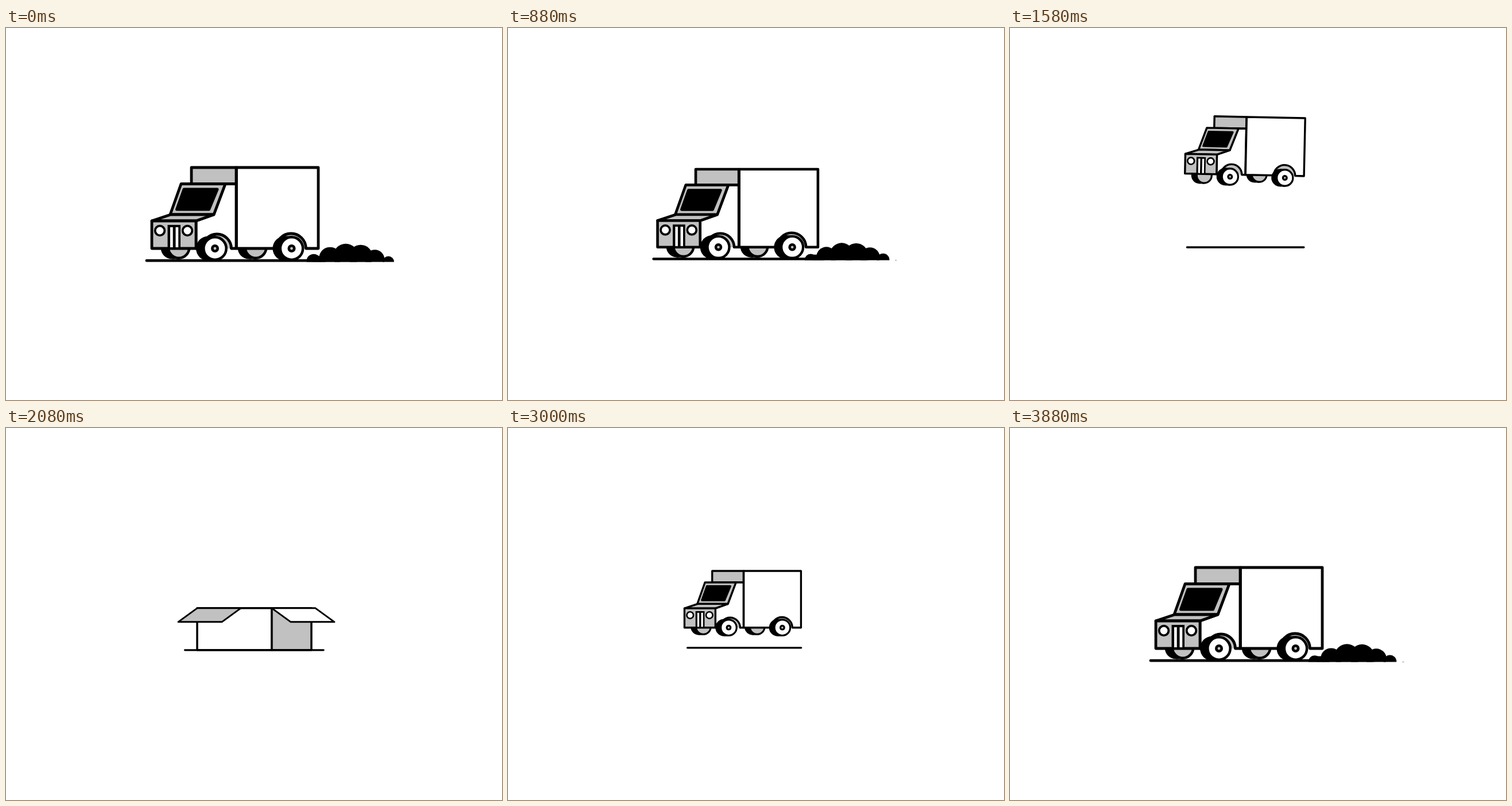
These frames come from a looping animation (864 px wide and 648 px high, 3930 ms). An HTML page with a canvas:

```html
<!DOCTYPE html>
<html lang="en">
<head>
<meta charset="utf-8">
<title>Delivery truck</title>
<style>
  html, body { margin: 0; width: 100%; height: 100%; overflow: hidden; background: #fff; }
  canvas { display: block; }
</style>
</head>
<body>
<canvas id="stage" width="864" height="648"></canvas>
<script>
const ctx = document.getElementById('stage').getContext('2d');
const LOOP = 3930, FRAMES = 94, TICK = 1000 / 24;
const CX = 432, CY = 324, FLOOR = 384, ROAD = 405.2, LINE = 4.8;
const BLACK = '#000', GRAY = '#c1c1c1', WHITE = '#fff';

// Timing helpers; a and b are the first and last tick of a move.
const ramp = (f, a, b) => Math.min(1, Math.max(0, (f - a) / (b - a)));
const easeIn = (f, a, b) => ramp(f, a, b) ** 2;
const easeOut = (f, a, b) => 1 - (1 - ramp(f, a, b)) ** 2;
const smooth = (f, a, b) => ramp(f, a, b) ** 2 * (3 - 2 * ramp(f, a, b));
const bump = (f, a, b) => Math.sin(Math.PI * ramp(f, a, b));
const mix = (a, b, u) => a + (b - a) * u;

const zoom = f => f < 60 ? 1 - .3 * easeIn(f, 11.5, 38.7) : 1 - .3 * (1 - ramp(f, 73, 94)) ** 3;
const leap = f => easeOut(f, 29, 39.5) - easeIn(f, 41, 48.5);
const hop = f => easeOut(f, 53.5, 61) - easeIn(f, 65, 73);
const lift = f => 113 * leap(f) + 78 * hop(f);
const boxed = f => smooth(f, 43, 50) - smooth(f, 53, 60);
const sink = f => (6 * ramp(f, 48, 50) + 35 * smooth(f, 53, 64)) * (1 - smooth(f, 65.5, 73));
const wheelSize = (f, pop) => 1 - ramp(f, 39.5, 42) + ramp(f, pop, pop + 3);

let cam = 1;

function view() {
  ctx.setTransform(cam, 0, 0, cam, CX * (1 - cam), CY * (1 - cam));
}

// Strokes keep their width whatever the current stretch.
function paint(fill, width = 0) {
  if (fill) { ctx.fillStyle = fill; ctx.fill(); }
  if (!width) return;
  ctx.save();
  ctx.setTransform(cam, 0, 0, cam, 0, 0);
  ctx.lineWidth = width;
  ctx.stroke();
  ctx.restore();
}

function poly(points, fill, width) {
  ctx.beginPath();
  points.forEach(([x, y]) => ctx.lineTo(x, y));
  ctx.closePath();
  paint(fill, width);
}

const rect = (x, y, r, b, fill, width) => poly([[x, y], [r, y], [r, b], [x, b]], fill, width);

function disc(x, y, r, fill, width) {
  ctx.beginPath();
  ctx.arc(x, y, r, 0, 7);
  paint(fill, width);
}

function dome(x, r, fill, width) {
  ctx.beginPath();
  ctx.arc(x, FLOOR, r, Math.PI, 0);
  paint(fill, width);
}

function drawGround(f) {
  const far = (1 - cam) / .3;
  const shift = 6 * hop(f) * far;
  const y = ROAD + sink(f) / cam;
  view();
  poly([[245 + 15 * far + shift, y], [556 - 13 * far + 62 * boxed(f) + shift, y]], null, LINE);
}

function drawSmoke(f) {
  const size = f < 50 ? 1 - smooth(f, 24, 31) : easeOut(f, 74, 84);
  if (size <= 0) return;
  const age = f < 50 ? f : f - FRAMES;
  const phase = ((age / 5.5) % 1 + 1) % 1;
  view();
  ctx.save();
  ctx.translate(510, 407.5);
  ctx.scale(size, size);
  ctx.beginPath();
  ctx.rect(-30, -80, 300, 80);
  ctx.clip();
  for (let n = 0; n < 7; n++) {
    const v = n + phase;
    const swell = Math.sin(Math.PI * (v / 7) ** .9);
    const x = 26 * v - 3 + 7 * Math.sin(Math.PI * v / 7);
    disc(x, 2 - 12 * swell * swell, 22 * swell ** .85, BLACK);
  }
  // fills the hollows between neighbouring puffs
  rect(24, -10, 126, 0, BLACK);
  ctx.restore();
}

function drawWheel(x, y, size, kx, ky, near) {
  if (size <= .01) return;
  ctx.save();
  ctx.translate(x, y);
  ctx.scale(size / kx, size / ky);
  const r = near ? 22 : 20.5;
  disc(-11.5, 0, r - .5, BLACK);
  rect(-11.5, .5 - r, 0, r - .5, BLACK);
  disc(0, 0, r - 2.3, near ? WHITE : GRAY, 4.5);
  if (near) {
    disc(0, 0, 7, BLACK);
    disc(0, 0, 2.4, GRAY);
  }
  ctx.restore();
}

function drawFace(shift) {
  ctx.save();
  ctx.translate(shift, 0);
  poly([[305, 271.5], [382, 271.5], [362, 325], [286, 325]], GRAY, LINE);
  poly([[310, 281], [368, 281], [353.5, 316], [297.5, 316]], BLACK, 5);
  poly([[254, 336], [287, 325], [362, 325], [331, 336]], GRAY, LINE);
  rect(254, 336, 331, 384, GRAY, LINE);
  for (const x of [268, 316]) disc(x, 353, 8.3, WHITE, 3.8);
  rect(281.5, 343, 304, 384, BLACK);
  for (const x of [286, 295.5]) rect(x, 347, x + 4.7, 382, WHITE);
  ctx.restore();
}

function drawCargo(arch) {
  ctx.beginPath();
  ctx.moveTo(401.5, 243);
  ctx.lineTo(544, 243);
  ctx.lineTo(544, FLOOR);
  ctx.arc(496.5, FLOOR, 26 * arch, 0, Math.PI, true);
  ctx.lineTo(401.5, FLOOR);
  ctx.closePath();
  paint(WHITE, LINE);
}

function drawTruck(f) {
  const crouch = bump(f, 27, 31) + bump(f, 72, 76), wobble = bump(f, 60, 68);
  const kx = 1 + .04 * crouch + .13 * wobble, ky = 1 - .07 * crouch - .086 * wobble;
  const tilt = 1.4 * bump(f, 30, 42) + 3.6 * wobble;
  const fold = smooth(f, 40, 43) - easeOut(f, 60, 66.6);
  const arch = 1 - ramp(f, 41, 43) + ramp(f, 60, 62);
  const face = 147 * fold, roof = 78 * fold ** 1.2, drop = 5.5 * leap(f);
  const front = wheelSize(f, 61), rear = wheelSize(f, 64);

  view();
  ctx.translate(CX - 5 * wobble, FLOOR - lift(f) / cam);
  ctx.rotate(tilt * Math.PI / 180);
  ctx.scale(kx, ky);
  ctx.translate(-CX, -FLOOR);

  drawWheel(301 + face, 382.5 + drop, wheelSize(f, 62.2), kx, ky, false);
  drawWheel(435, 382.5, rear, kx, ky, false);

  rect(323 + roof, 243, 401, 271.5, GRAY, LINE);
  poly([[331 + face, 336], [362 + face, 325], [Math.min(382 + face, 401), 271.5],
    [401, 271.5], [401, FLOOR], [331 + face, FLOOR]], WHITE, LINE);
  const archX = 367.5 + roof, archR = 25 * arch;
  rect(archX - archR, 383, archX + archR, 387, WHITE);
  dome(archX, archR, GRAY, LINE);
  drawFace(face);

  if (rear > .01) dome(496.5, 26 * arch, GRAY);
  drawCargo(arch);
  drawWheel(364 + roof, FLOOR + drop, front, kx, ky, true);
  drawWheel(497.5, FLOOR + drop, rear, kx, ky, true);
}

function drawBox(f) {
  const m = boxed(f);
  const left = mix(410, 333, m), corner = mix(511, 463, m), right = mix(511, 532, m);
  const bottom = CY + cam * (mix(FLOOR, ROAD, m) - CY) + 6 * m - lift(f);
  const top = bottom - mix(99, 73, m);
  ctx.setTransform(1, 0, 0, 1, 0, 0);
  rect(left, top, corner, bottom, WHITE, 5);
  rect(corner, top, right, bottom, GRAY, 5);

  const open = easeOut(f, 47.5, 50) - ramp(f, 53, 56);
  if (open <= .01) return;
  const w = (right - left) * .382, lean = 33 * open, dy = 24 * open - 72 * open * (1 - open);
  const flap = (x, dx, fill) =>
    poly([[x, top], [x + w, top], [x + w + dx, top + dy], [x + dx, top + dy]], fill, 4.2);
  flap(left, -lean, GRAY);
  flap(corner, lean, WHITE);
}

function draw(f) {
  cam = zoom(f);
  ctx.setTransform(1, 0, 0, 1, 0, 0);
  ctx.fillStyle = WHITE;
  ctx.fillRect(0, 0, 864, 648);
  ctx.strokeStyle = BLACK;
  ctx.lineJoin = ctx.lineCap = 'round';
  drawGround(f);
  drawSmoke(f);
  if (f > 43 && f < 60) drawBox(f);
  else drawTruck(f);
}

const start = performance.now();
function loop() {
  const t = Math.max(0, performance.now() - start) % LOOP;
  draw(Math.min(FRAMES - 1, Math.floor((t + 5) / TICK)));
  requestAnimationFrame(loop);
}
loop();
</script>
</body>
</html>
```
